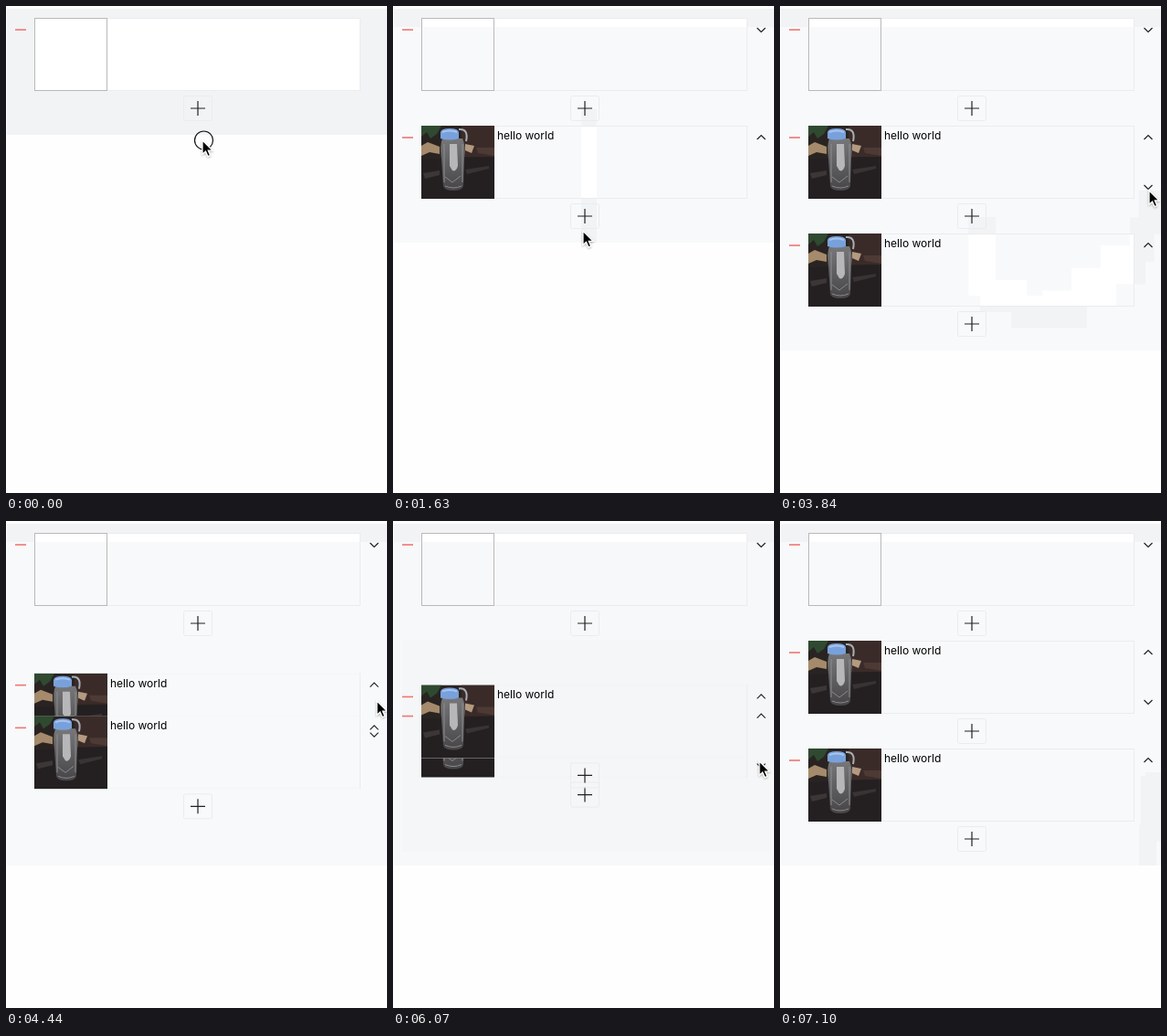
These frames come from a looping animation (417 by 533 pixels, 7730 ms). An HTML page:

```html
<!DOCTYPE html>
<html lang="en">
<head>
<meta charset="utf-8">
<title>Sortable list</title>
<style>
html, body { margin: 0; width: 100%; height: 100%; overflow: hidden; background: #fefefe; }
svg { display: block; width: 417px; height: 533px; }
text { font: 12px Inter, "Open Sans", sans-serif; fill: #000; }
.line { fill: none; stroke: #ebecee; }
.icon { fill: none; stroke: #222; stroke-width: 1.2; }
.minus { stroke: #ef7673; stroke-width: 1.6; }
</style>
</head>
<body>
<svg viewBox="0 0 417 533" xmlns="http://www.w3.org/2000/svg">
  <defs>
    <clipPath id="frame"><rect width="80" height="80"/></clipPath>
    <clipPath id="trail"><path id="trailPath"/></clipPath>
    <filter id="soft" x="-20%" y="-20%" width="140%" height="140%"><feGaussianBlur stdDeviation=".6"/></filter>
    <filter id="shade" x="-50%" y="-50%" width="200%" height="200%">
      <feDropShadow dx="0" dy="1" stdDeviation="1" flood-opacity=".35"/>
    </filter>
    <linearGradient id="body" x1="0" y1="0" x2="0" y2="1">
      <stop offset="0" stop-color="#77777a"/>
      <stop offset=".55" stop-color="#5c5b5d"/>
      <stop offset="1" stop-color="#474547"/>
    </linearGradient>
    <g id="photo" clip-path="url(#frame)">
      <rect width="80" height="80" fill="#292422"/>
      <g filter="url(#soft)">
        <path d="M44 0H80V34H44Z" fill="#3a2b29"/>
        <path d="M0 0H22L17 9L10 14L6 7L0 12Z" fill="#2f4a31"/>
        <path d="M0 22L7 18L20 23V31L9 29L0 33Z" fill="#a58a6b"/>
        <path d="M48 20L58 22L55 30L48 27Z" fill="#b39a80"/>
        <path d="M60 24H80V33L62 30Z" fill="#4d3a35"/>
        <path d="M0 37L80 34V80H0Z" fill="#242021"/>
        <path d="M2 52L20 49V54L4 58Z" fill="#3c3736"/>
        <path d="M48 48L74 44V47L50 53Z" fill="#393333"/>
        <path d="M41 4Q52 3 49 17" fill="none" stroke="#a9aeb5" stroke-width="2"/>
        <path d="M23 14H45Q49 22 47 36L46 66Q45 71 35 71Q25 71 24 66L22 36Q20 22 23 14Z" fill="url(#body)"/>
        <path d="M25 20V62M45 20V62" stroke="#8e8e91" fill="none"/>
        <path d="M31 20H39L40 44Q38 51 34 49L31 44Z" fill="#b7b7b9"/>
        <path d="M26 56L34 62L43 55M26 66Q35 70 44 66" stroke="#8a898b" fill="none"/>
        <path d="M21 14V7Q22 3 31 3Q40 3 41 7V14Q31 17 21 14Z" fill="#78a1dc"/>
        <path d="M23 7Q31 4 39 7" stroke="#a9c5ee" stroke-width="2" fill="none"/>
      </g>
    </g>
  </defs>
  <rect width="417" height="533" fill="#fefefe"/>
  <g id="plain"></g>
  <rect id="tint" x="1" y="23" width="416"/>
  <rect id="inner" x="10" y="131" width="405" height="231"/>
  <g id="bared" clip-path="url(#trail)"></g>
  <g id="rows"></g>
  <circle id="ring" cx="216.5" cy="147" r="10" fill="none" stroke="#111" stroke-width="1.2"/>
  <g id="cursor">
    <path id="arrow" d="M0 0V15.2L3.5 12L6 17.6L8.6 16.5L6.2 11H11Z" fill="#000" stroke="#fff" stroke-width="1.2" filter="url(#shade)"/>
    <path id="beam" d="M-3.5 -7.5Q0 -7.5 0 -5Q0 -7.5 3.5 -7.5M0 -5V5M-3.5 7.5Q0 7.5 0 5Q0 7.5 3.5 7.5M-2 1H2" fill="none" stroke="#111" stroke-width="1.2"/>
  </g>
</svg>
<script>
const LOOP = 7730, STEP = 147.9, TOP = 13, PITCH = 118;
const ADD = [5, 16];             // steps at which a row is added
const SWAP = [4026, 5813], SWAP_MS = 1000;
const TRAILS = [[8, 15], [19, 26], [35, 39], [45, 52]];
const HIDE = 48;

// time, x, y of the pointer tip
const PATH = [
  [0, 215, 147], [150, 215, 147], [590, 208, 113], [1040, 208, 113],
  [1630, 208, 247], [2220, 208, 230], [2660, 208, 230], [2805, 220, 299],
  [3110, 290, 335], [3550, 385, 262], [3840, 404, 202], [4440, 406, 197],
  [5030, 405, 197], [5320, 403, 236], [5620, 401, 263], [6070, 401, 263],
  [6655, 402, 279], [6803, 397, 332], [6951, 395, 512]
];

const $ = id => document.getElementById(id);
const set = (el, attrs) => { for (const k in attrs) el.setAttribute(k, attrs[k]); };
const show = (el, on) => set(el, { visibility: on ? "visible" : "hidden" });
const shift = (el, x, y) => set(el, { transform: `translate(${x} ${y})` });
const bottom = n => 141 + (n - 1) * PITCH;

function makeRow(i) {
  const g = document.createElementNS("http://www.w3.org/2000/svg", "g");
  g.innerHTML = `
    <rect class="fill" x="31" width="357" height="80"/>
    <path class="line edge" d="M31 .5H388M31 79.5H388"/>
    <path class="line" d="M387.5 0V80"/>
    ${i ? '<use href="#photo" x="31"/><text x="114" y="15">hello world</text>'
        : '<rect x="31.5" y=".5" width="79" height="79" fill="none" stroke="#b9b9b9"/>'}
    <path class="minus" d="M10 13H22"/>
    <rect class="line" x="194.5" y="85.5" width="31" height="27" rx="2"/>
    <path class="icon" d="M202 99H218M210 91V107"/>
    ${i ? '<path class="icon" d="M398.5 15L403 10.5L407.5 15"/>' : ""}
    <path class="icon down" d="M398.5 ${i ? 65 : 11}l4.5 4.5l4.5 -4.5"/>`;
  $("rows").append(g);
  return { g, fill: g.querySelector(".fill"), edge: g.querySelector(".edge"), down: g.querySelector(".down") };
}

const rows = [0, 1, 2].map(makeRow);

function bezier(a, b, u) {
  return 3 * a * u * (1 - u) ** 2 + 3 * b * u * u * (1 - u) + u ** 3;
}

// cubic-bezier(.25, .1, .25, 1)
function ease(x) {
  let lo = 0, hi = 1;
  for (let i = 0; i < 20; i++) {
    const mid = (lo + hi) / 2;
    if (bezier(.25, .25, mid) < x) lo = mid; else hi = mid;
  }
  return bezier(.1, 1, lo);
}

function pointer(t) {
  const i = PATH.findIndex(p => p[0] > t);
  if (i < 0) return PATH[PATH.length - 1].slice(1);
  const [t0, x0, y0] = PATH[i - 1], [t1, x1, y1] = PATH[i];
  const u = (t - t0) / (t1 - t0);
  return [x0 + (x1 - x0) * u, y0 + (y1 - y0) * u];
}

// area uncovered by the pointer between steps a and b
function sweep(a, b) {
  let d = "";
  for (let k = a; k <= b; k++) {
    const [x0, y0] = pointer((k - 1) * STEP), [x1, y1] = pointer(k * STEP);
    const l = Math.min(x0, x1) - 2, r = Math.max(x0, x1) + 15;
    const t = Math.min(y0, y1), b = Math.max(y0, y1) + 18;
    d += `M${l} ${t}H${r}V${b}H${l}Z`;
  }
  return d;
}

function ground(n) {
  let s = `<rect x="1" y="3" width="416" height="${bottom(n) - 3}" fill="#f1f3f5"/>`;
  for (let i = 0; i < n; i++)
    s += `<rect x="31" y="${TOP + i * PITCH}" width="357" height="80" fill="#fff"/>`;
  return s;
}

let shown = 0;

function draw(ms) {
  const k = Math.floor((ms + 12) / STEP), t = k * STEP;
  const n = 1 + ADD.filter(a => k >= a).length;

  const start = t < SWAP[1] ? SWAP[0] : SWAP[1];
  const moving = t >= start && t < start + SWAP_MS;
  const p = moving ? ease((t - start) / SWAP_MS) : 1;
  const second = start === SWAP[1];

  if (n !== shown) {
    $("plain").innerHTML = ground(n);
    $("bared").innerHTML = ground(n);
    shown = n;
  }

  const tint = moving && second ? "#f7f8f9" : t > SWAP[0] ? "#f8f9fa" : "#f8f9fb";
  const inner = moving ? (second ? "#f5f6f7" : "#f7f9fa") : "#f8faf9";
  set($("tint"), { fill: tint, height: bottom(n) - 23 });
  show($("tint"), n > 1);
  set($("inner"), { fill: inner });
  show($("inner"), moving || (t > SWAP[0] && !second));

  const span = TRAILS.find(s => k >= s[0] && k <= s[1]);
  set($("trailPath"), { d: span ? sweep(span[0], Math.min(k, HIDE - 1)) : "M0 0" });

  const tops = [TOP, TOP + PITCH * (2 - p), TOP + PITCH * (1 + p)];
  rows.forEach((row, i) => {
    row.g.style.display = i < n ? "" : "none";
    shift(row.g, 0, tops[i]);
    const live = moving && i > 0;
    set(row.fill, { fill: live ? inner : "none" });
    set(row.edge, { opacity: live ? .35 : 1 });
    row.down.style.display = i < n - 1 ? "" : "none";
  });

  const [x, y] = pointer(t);
  const typing = x > 111 && x < 388 && tops.slice(0, n).some(v => y > v && y < v + 80);
  shift($("cursor"), x, y);
  $("cursor").style.display = k < HIDE ? "" : "none";
  $("arrow").style.display = typing ? "none" : "";
  $("beam").style.display = typing ? "" : "none";
  show($("ring"), k === 0);
}

const begin = performance.now();
function tick() {
  draw((performance.now() - begin) % LOOP);
  requestAnimationFrame(tick);
}
tick();
</script>
</body>
</html>
```
